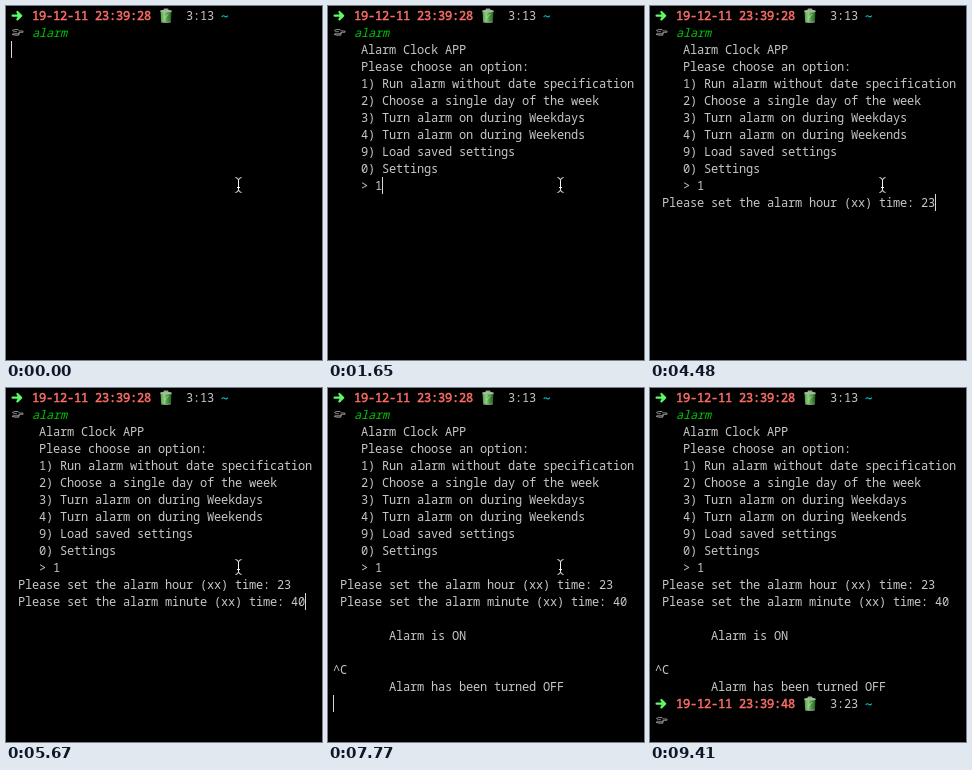
An HTML page that plays this animation: 316 by 354 pixels, repeating every 9560 ms.

```html
<!DOCTYPE html>
<html lang="en">
<head>
<meta charset="utf-8">
<title>Alarm clock in a terminal</title>
<style>
  html, body { margin: 0; width: 100%; height: 100%; overflow: hidden; background: #000; }
  svg { display: block; width: 316px; height: 354px; }
  text { font: 12px "Noto Sans Mono", "DejaVu Sans Mono", monospace; letter-spacing: -0.2px; white-space: pre; fill: #c7c7c7; }
  .date { fill: #ff6e67; stroke: #ff6e67; stroke-width: 0.5px; }
  .path { fill: none; stroke: #00c5c7; stroke-width: 1.1px; }
  .command { font-style: italic; fill: #00c200; }
</style>
</head>
<body>
<svg id="stage" viewBox="0 0 316 354">
  <defs>
    <g id="arrow" fill="none" stroke="#5ffa68" stroke-width="2.2" stroke-linecap="round" stroke-linejoin="round">
      <path d="M6.6 9.7H14.4M11.4 6L15.2 9.7L11.4 13.4"/>
      <path d="M12 8L14.5 9.7L12 11.4Z" stroke-width="1"/>
    </g>
    <linearGradient id="charge">
      <stop offset="0" stop-color="#4f9a48"/>
      <stop offset="0.35" stop-color="#92cf80"/>
      <stop offset="0.6" stop-color="#4c9b43"/>
      <stop offset="1" stop-color="#256024"/>
    </linearGradient>
    <g id="battery">
      <rect x="157.5" y="2.5" width="5" height="2" rx="1" fill="#9aa596"/>
      <path d="M154.5 4.5Q160 3 165.5 4.5L164.8 16.3Q160 17.6 155.2 16.3Z" fill="url(#charge)"/>
      <path d="M154.5 4.5Q160 3 165.5 4.5V6Q160 7 154.5 6Z" fill="#a3ba9a"/>
      <path d="M155.2 15.2Q160 16.4 164.8 15.2V16.3Q160 17.6 155.2 16.3Z" fill="#81917c"/>
      <path d="M162.5 8L158.5 12" stroke="#b8dfaa" stroke-width="0.8"/>
    </g>
    <g id="hand" fill="none" stroke="#9a9a9a" stroke-width="0.9">
      <path d="M6 7.5L9 6.5H12L13.5 8H17V9.3H12.5M13.3 9.3V10.8H11.5M12.8 10.8V12.2H8.5L6 11.2Z"/>
      <path d="M7 8.5H11M7 10.3H11" stroke="#707070"/>
    </g>
  </defs>
  <g id="screen"></g>
  <rect id="caret" width="1" height="17" fill="#d8d8d8"/>
  <g id="pointer" fill="none" stroke="#f4f4f4">
    <path d="M-3 -7.5Q0 -7.2 0 -4.5Q0 -7.2 3 -7.5M0 -4.5V4.5M-3 7.5Q0 7.2 0 4.5Q0 7.2 3 7.5M-1.5 2.5H1.5"/>
  </g>
</svg>
<script>
const LOOP = 9560, CELL = 7, ROW = 17, LEFT = 5, TOP = 1, BASE = 13;
const SVG = "http://www.w3.org/2000/svg";
const screen = document.getElementById("screen");
const caret = document.getElementById("caret");
const pointer = document.getElementById("pointer");
const timed = [];

const columnX = column => LEFT + CELL * column;
const rowY = row => TOP + ROW * row;

function add(tag, start, attributes, content = "") {
  const node = document.createElementNS(SVG, tag);
  for (const key in attributes) node.setAttribute(key, attributes[key]);
  node.textContent = content;
  screen.append(node);
  timed.push({ node, start });
}

function write(start, row, column, content, style = "") {
  add("text", start, { x: columnX(column), y: rowY(row) + BASE, class: style }, content);
}

function prompt(start, row, clock, battery) {
  const y = ROW * row;
  add("use", start, { href: "#arrow", y });
  write(start, row, 3, "19-12-11 " + clock, "date");
  add("use", start, { href: "#battery", y });
  write(start, row, 25, battery);
  add("path", start, { d: `M215.7 ${y + 11}q1.4 -2.2 3 -0.7t3 -0.7`, class: "path" });
  add("use", start, { href: "#hand", y: y + ROW });
}

prompt(0, 0, "23:39:28", "3:13");
write(0, 1, 3, "alarm", "command");
[
  "Alarm Clock APP",
  "Please choose an option:",
  "1) Run alarm without date specification",
  "2) Choose a single day of the week",
  "3) Turn alarm on during Weekdays",
  "4) Turn alarm on during Weekends",
  "9) Load saved settings",
  "0) Settings",
  ">"
].forEach((line, i) => write(600, 2 + i, 4, line));
write(1650, 10, 6, "1");
write(2090, 11, 1, "Please set the alarm hour (xx) time:");
write(3880, 11, 38, "2");
write(4480, 11, 39, "3");
write(4770, 12, 1, "Please set the alarm minute (xx) time:");
write(5520, 12, 40, "4");
write(5670, 12, 41, "0");
write(6270, 14, 8, "Alarm is ON");
write(7770, 16, 0, "^C");
write(7770, 17, 8, "Alarm has been turned OFF");
prompt(7920, 18, "23:39:48", "3:23");

// [start, column, row]; a bare start hides the item
const caretSteps = [
  [0, 0, 2], [600, 6, 10], [1650, 7, 10], [2090, 38, 11], [3140], [3590, 38, 11],
  [3880, 39, 11], [4480, 40, 11], [4770, 40, 12], [5520, 41, 12], [5670, 42, 12],
  [6270, 0, 16], [7320], [7770, 0, 18], [7920, 3, 19], [9410]
];
// [start, x, y]
const pointerSteps = [
  [0, 232.5, 179], [8510, 228.5, 179], [8660, 161, 241], [8810, 221.5, 338], [8960]
];

const show = (node, visible) => node.setAttribute("visibility", visible ? "visible" : "hidden");
const stepAt = (steps, time) => steps.findLast(([start]) => start <= time);

function render(time) {
  for (const { node, start } of timed) show(node, time >= start);

  const [, column, row] = stepAt(caretSteps, time);
  show(caret, column !== undefined);
  if (column !== undefined) {
    caret.setAttribute("x", columnX(column));
    caret.setAttribute("y", rowY(row));
  }

  const [, x, y] = stepAt(pointerSteps, time);
  show(pointer, x !== undefined);
  if (x !== undefined) pointer.setAttribute("transform", `translate(${x} ${y})`);
}

const origin = performance.now();
function tick() {
  render((performance.now() - origin) % LOOP);
  requestAnimationFrame(tick);
}
render(0);
requestAnimationFrame(tick);
</script>
</body>
</html>
```
